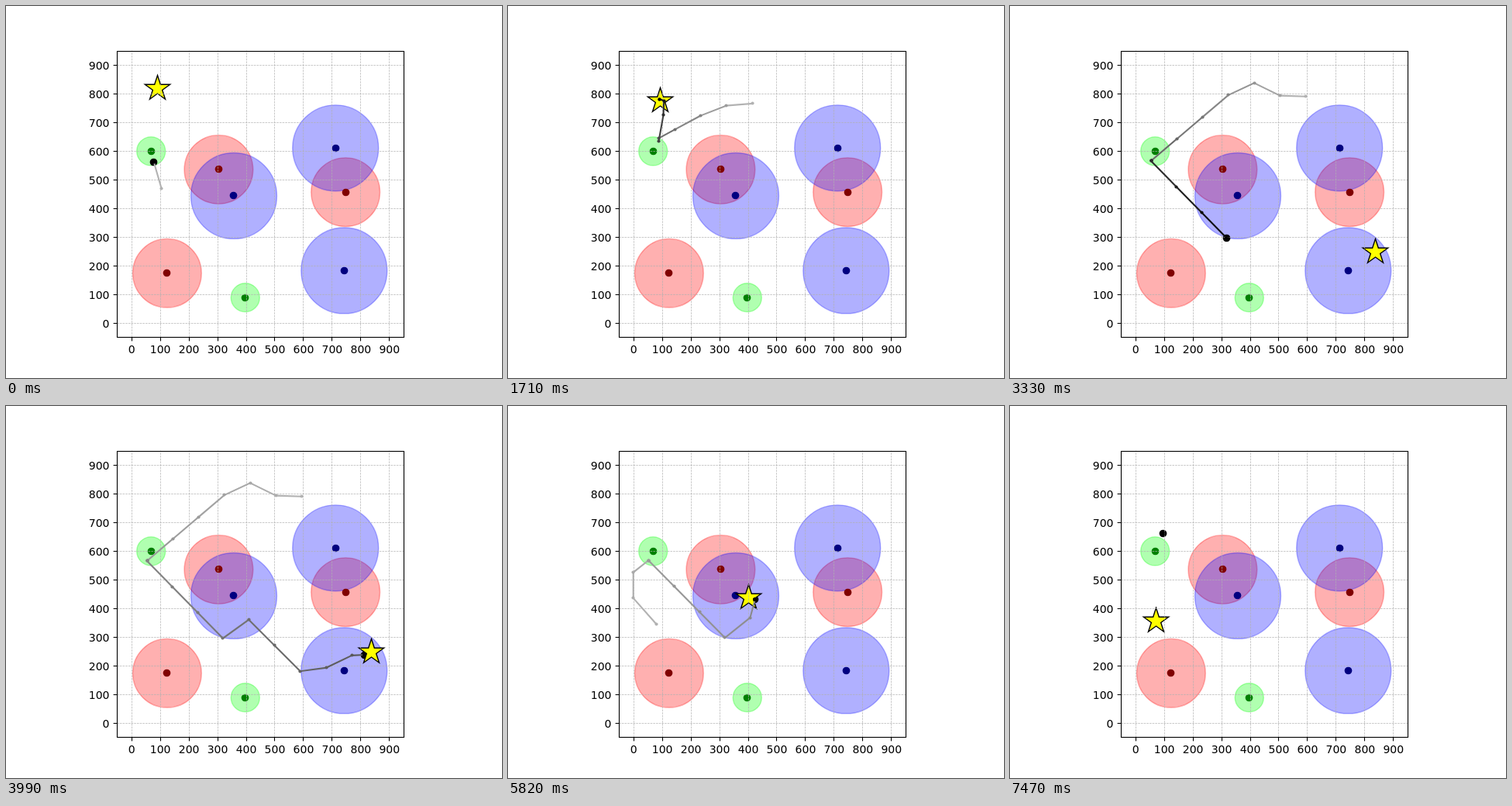
Recreate the animation shown at these times as an HTML page with a canvas. Size 640x480 px, loop 7.5 s.

```html
<!DOCTYPE html>
<html>
<head>
<meta charset="utf-8">
<style>
html, body { margin: 0; width: 100%; height: 100%; overflow: hidden; background: #fff; }
canvas { display: block; }
</style>
</head>
<body>
<canvas id="stage" width="640" height="480"></canvas>
<script>
const ctx = document.getElementById('stage').getContext('2d');
const FRAME_MS = 30, FRAMES = 250, EPISODE = 50;
const LEFT = 143.2, RIGHT = 512.8, TOP = 57.6, BOTTOM = 427.2;
const SCALE = (RIGHT - LEFT) / 1000;
const STRIDE = 90, PAUSE = 3;

// Plot units to pixels
const px = x => LEFT + (x + 50) * SCALE;
const py = y => BOTTOM - (y + 50) * SCALE;
const snap = v => Math.round(v) + 0.5;
const pin = ([x, y]) => [Math.floor(px(x)) + 0.5, Math.floor(py(y)) + 0.5];

const kinds = [
  { radius: 120, rgb: '255,0,0', core: '#800000', at: [[305, 535], [748, 456], [125, 173]] },
  { radius: 50, rgb: '0,255,0', core: '#008000', at: [[69, 599], [398, 88]] },
  { radius: 150, rgb: '0,0,255', core: '#000080', at: [[358, 443], [713, 610], [743, 182]] }
];
const REST = kinds[1].at[0];

// Each episode: where the star stands and the turning points of the walk
const episodes = [
  { star: [92, 818], turns: [[105, 470], [79, 560], [89, 650], [119, 740], [120, 805], [93, 820]] },
  { star: [94, 775], turns: [[415, 765], [325, 758], [235, 723], [90, 645], [89, 635], [105, 725], [107, 775], [92, 780]] },
  { star: [838, 246], turns: [[595, 790], [505, 793], [415, 837], [325, 795], [55, 565], [320, 295], [410, 360],
    [590, 180], [680, 192], [770, 235], [815, 237]] },
  { star: [402, 435], turns: [[80, 345], [0, 435], [0, 525], [53, 567], [320, 297], [408, 367], [425, 430]] },
  { star: [668, 580], turns: [[302, 840], [69, 599], [158, 689], [248, 702], [338, 702], [430, 680], [610, 583], [660, 585]] },
  { star: [73, 356], turns: [[98, 662]] }
];

// Walk towards each turn, at most one stride along either axis per step;
// rest for a while beside the first green centre
function walk(turns) {
  let [x, y] = turns[0];
  const steps = [[x, y]];
  for (const [tx, ty] of turns.slice(1)) {
    const dx = tx - x, dy = ty - y;
    const strides = Math.max(Math.abs(dx), Math.abs(dy)) / STRIDE;
    const count = Math.ceil(strides - 0.1);
    for (let i = 1; i <= count; i++) {
      const k = i === count ? 1 : i / strides;
      steps.push([x + dx * k, y + dy * k]);
    }
    [x, y] = [tx, ty];
    if (Math.hypot(x - REST[0], y - REST[1]) < 38)
      for (let i = 0; i < PAUSE; i++) steps.push([x, y]);
  }
  return steps;
}
for (const e of episodes) e.steps = walk(e.turns);

function disc(x, y, r, color) {
  ctx.beginPath();
  ctx.arc(x, y, r, 0, 2 * Math.PI);
  ctx.fillStyle = color;
  ctx.fill();
}

function line(x1, y1, x2, y2) {
  ctx.beginPath();
  ctx.moveTo(x1, y1);
  ctx.lineTo(x2, y2);
  ctx.stroke();
}

const dot = (point, color) => disc(...pin(point), 4.86, color);

function drawZones() {
  ctx.lineWidth = 1.39;
  for (const { radius, rgb, at } of kinds) {
    const tint = ctx.strokeStyle = `rgba(${rgb},0.31)`;
    for (const [x, y] of at) {
      disc(px(x), py(y), radius * SCALE, tint);
      ctx.stroke();
    }
  }
  for (const { core, at } of kinds) at.forEach(p => dot(p, core));
}

function drawStar(point) {
  const [x, y] = pin(point), size = 17;
  ctx.beginPath();
  for (let i = 0; i < 10; i++) {
    const r = i % 2 ? size * 0.382 : size, a = i * Math.PI / 5;
    ctx.lineTo(x + r * Math.sin(a), y - r * Math.cos(a));
  }
  ctx.closePath();
  ctx.fillStyle = '#ff0';
  ctx.fill();
  ctx.strokeStyle = '#000';
  ctx.lineWidth = 1.39;
  ctx.stroke();
}

function drawGrid() {
  ctx.strokeStyle = '#b0b0b0';
  ctx.lineWidth = 0.69;
  ctx.setLineDash([2.57, 1.11]);
  for (let v = 0; v <= 900; v += 100) {
    const x = snap(px(v)), y = snap(py(v));
    line(x, BOTTOM, x, TOP);
    line(LEFT, y, RIGHT, y);
  }
  ctx.setLineDash([]);
}

function drawAxes() {
  ctx.strokeStyle = ctx.fillStyle = '#000';
  ctx.lineWidth = 1.11;
  ctx.strokeRect(143.5, 58.5, 370, 369);
  ctx.font = '14px "DejaVu Sans", sans-serif';
  for (let v = 0; v <= 900; v += 100) {
    const x = snap(px(v)), y = snap(py(v));
    line(x, 427.5, x, 432.4);
    line(143.5, y, 138.6, y);
    ctx.textAlign = 'center';
    ctx.fillText(v, px(v) + 0.5, 448);
    ctx.textAlign = 'right';
    ctx.fillText(v, 133.5, Math.round(py(v)) + 6);
  }
}

// The trail darkens from light grey at its start to black at the agent
function drawTrail(at, step) {
  ctx.lineWidth = 2.08;
  ctx.lineCap = 'square';
  for (let i = 0; i < step; i++) {
    const a = at(i), b = at(i + 1);
    const g = Math.round(178 * (1 - i / step));
    const shade = ctx.strokeStyle = `rgb(${g},${g},${g})`;
    if (a !== b) line(px(a[0]), py(a[1]), px(b[0]), py(b[1]));
    disc(...pin(a), 2.1, shade);
  }
  ctx.lineCap = 'butt';
  disc(...pin(at(step)), 2.3, '#000');
}

function draw(now) {
  const n = Math.floor(now / FRAME_MS) % FRAMES + 1;
  const step = n % EPISODE;
  const { star, steps } = episodes[Math.floor(n / EPISODE)];
  const at = i => steps[Math.min(i, steps.length - 1)];
  ctx.fillStyle = '#fff';
  ctx.fillRect(0, 0, 640, 480);
  drawZones();
  dot(at(step), '#000');
  drawStar(star);
  drawGrid();
  drawTrail(at, step);
  drawAxes();
}

const start = performance.now();
function tick() {
  draw(performance.now() - start);
  requestAnimationFrame(tick);
}
tick();
</script>
</body>
</html>
```
